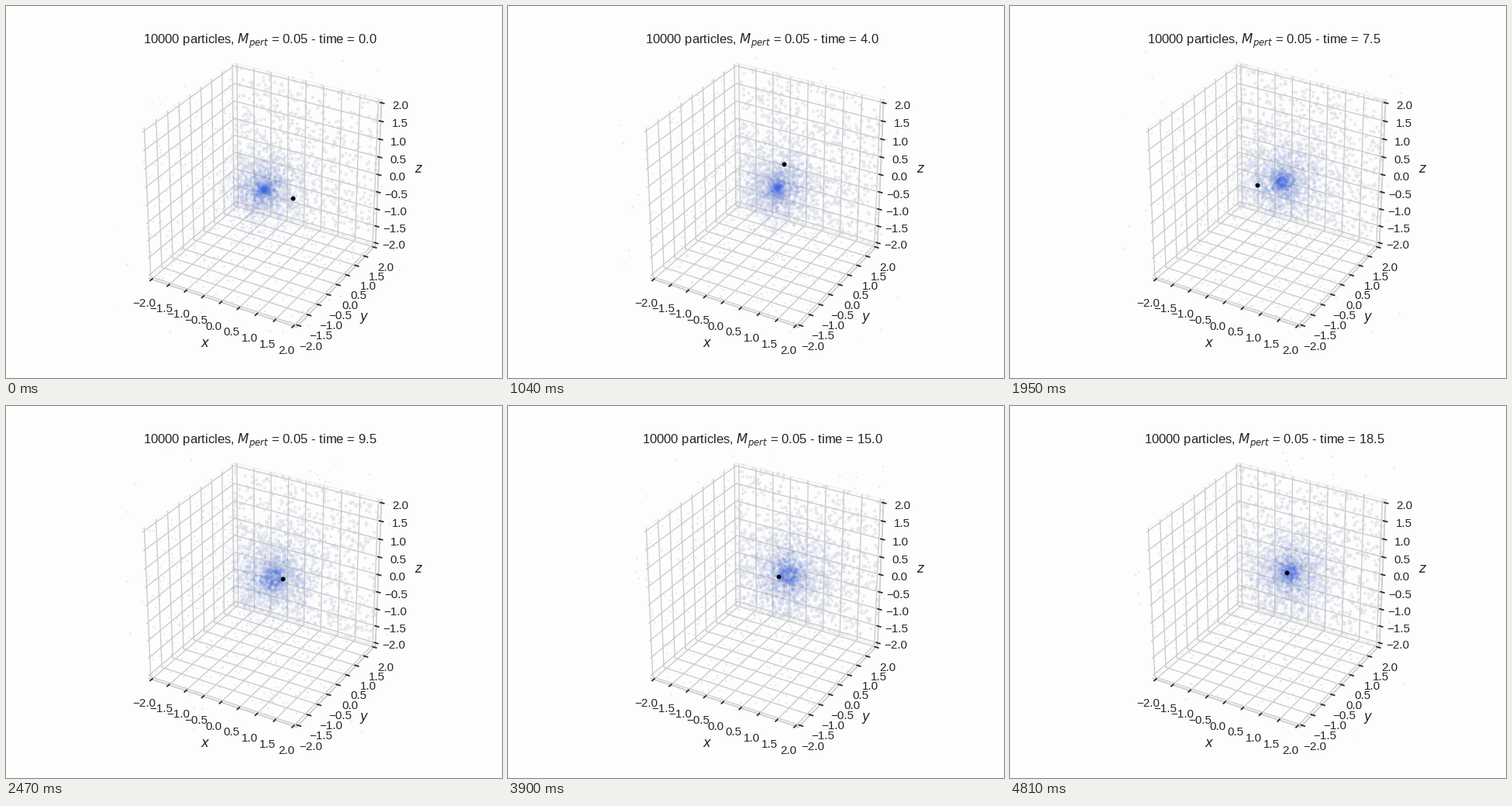
A matplotlib script for the animation above (4940 ms loop, 640 by 480 pixels).

```python
import numpy as np
import matplotlib.pyplot as plt
from matplotlib.animation import FuncAnimation
from matplotlib.path import Path
from mpl_toolkits.mplot3d import proj3d

FRAMES, INTERVAL, STEP = 38, 130, 0.5
BACKGROUND = "#fdfdfd"

plt.rcParams.update({
    "font.family": "Liberation Sans",
    "text.color": ".15", "axes.labelcolor": ".15",
    "xtick.color": ".15", "ytick.color": ".15",
    "axes.edgecolor": ".8", "axes.linewidth": 1.25,
    "grid.color": ".8", "grid.linewidth": 1,
    "xtick.major.width": 1.25, "ytick.major.width": 1.25,
    "axes.titlesize": 12, "axes.labelsize": 12,
    "xtick.labelsize": 11, "ytick.labelsize": 11,
    "figure.facecolor": BACKGROUND, "savefig.facecolor": BACKGROUND,
})

# Motion of the cluster centre and the perturber's decaying orbit around it
KEYS = np.array([0, 4, 6, 9.5, 12.5, 15, 18.5])
CENTRE_X = [0, 0.20, 0.22, -0.08, -0.02, 0.11, 0.05]
CENTRE_Y = [0, 0.22, 0.41, 0.63, 0.75, 0.91, 1.01]
ORBIT_R = [0.8, 1.22, 0.96, 0.21, 0.12, 0.26, 0.08]
ORBIT_ANGLE = np.radians([0, 112, 145, 379, 669, 947, 1291])


def track(t, values):
    """Smooth cubic interpolation through the key times."""
    slopes = np.gradient(values, KEYS)
    i = min(np.searchsorted(KEYS, t, side="right") - 1, len(KEYS) - 2)
    h = KEYS[i + 1] - KEYS[i]
    s = (t - KEYS[i]) / h
    return ((1 + 2 * s) * (1 - s) ** 2 * values[i]
            + s * (1 - s) ** 2 * h * slopes[i]
            + s * s * (3 - 2 * s) * values[i + 1]
            + s * s * (s - 1) * h * slopes[i + 1])


def centre(t):
    return np.array([track(t, CENTRE_X), track(t, CENTRE_Y), 0])


def perturber(t):
    r, a = track(t, ORBIT_R), track(t, ORBIT_ANGLE)
    return centre(t) + r * np.array([np.cos(a), np.sin(a), 0])


class Stars:
    """Stars on randomly tilted circular orbits, uniform in radius."""

    def __init__(self, n, r_max, rng):
        self.r = r_max * rng.random(n)
        a, b = rng.normal(size=(2, n, 3))
        a /= np.linalg.norm(a, axis=1, keepdims=True)
        b -= a * np.sum(a * b, axis=1, keepdims=True)
        b /= np.linalg.norm(b, axis=1, keepdims=True)
        self.a, self.b = a, b
        self.rate = 0.5 / np.maximum(self.r, 0.1)
        self.rank = rng.random(n)

    def at(self, t, spread=1, soft=0):
        r = np.hypot(self.r * spread, soft)[:, None]
        phase = (self.rate * t)[:, None]
        return centre(t) + r * (self.a * np.cos(phase) + self.b * np.sin(phase))


rng = np.random.default_rng(7)
core = Stars(1500, 1.3, rng)
halo = Stars(3000, 5, rng)

fig = plt.figure(figsize=(6.4, 4.8), dpi=100)
ax = fig.add_subplot(projection="3d")
ax.set_box_aspect((1, 1, 1))
ax.patch.set_visible(False)
ticks = np.linspace(-2, 2, 9)
LIM = 2 * 25 / 24
ax.set(xlim=(-LIM, LIM), ylim=(-LIM, LIM), zlim=(-LIM, LIM),
       xticks=ticks, yticks=ticks, zticks=ticks,
       xlabel="$x$", ylabel="$y$", zlabel="$z$")
for axis in (ax.xaxis, ax.yaxis, ax.zaxis):
    axis.pane.set_fill(False)
view = ax.get_proj()


def project(p):
    x, y, _ = proj3d.proj_transform(*np.atleast_2d(p).T, view)
    return np.column_stack([x, y])


def wall(*corners):
    return Path(project(LIM * np.array(corners)))


back = wall((-1, 1, -1), (1, 1, -1), (1, 1, 1), (-1, 1, 1))
floor = wall((-1, -1, -1), (1, -1, -1), (1, 1, -1), (-1, 1, -1))
side = wall((-1, -1, -1), (-1, 1, -1), (-1, 1, 1), (-1, -1, 1))


def layer(zorder):
    """Flat axes covering the square drawing area of the 3D axes."""
    flat = fig.add_axes([143.2 / 640, 0.11, 369.6 / 640, 0.77], zorder=zorder)
    flat.axis("off")
    flat.set(xlim=(-0.095, 0.09), ylim=(-0.095, 0.09))
    return flat


under, over = layer(-1), layer(5)
start = np.zeros(len(halo.r))
halo_dots = under.scatter(start, start, color=(0.87, 0.878, 0.91, 0.65),
                          linewidths=0)
core_colors = np.full((len(core.r), 4), (65 / 255, 105 / 255, 225 / 255, 1))
core_colors[:, 3] = 0.085 * (1 - (core.r / 1.4) ** 2)
start = np.zeros(len(core.r))
core_dots = over.scatter(start, start, s=9, c=core_colors, linewidths=0)
mass_dot = over.scatter([0], [0], s=18, color="black", linewidths=0, zorder=3)
for flat in (under, over):
    flat.set(xlim=(-0.095, 0.09), ylim=(-0.095, 0.09))


def update(i):
    t = i * STEP
    points = project(halo.at(t))
    on_back = back.contains_points(points)
    shown = np.select(
        [on_back, floor.contains_points(points), side.contains_points(points)],
        [1, 0.6, 0.5], 0.06)
    sizes = np.where(on_back, 9, 3.5) * (halo.rank < shown)
    halo_dots.set_offsets(points)
    halo_dots.set_sizes(sizes)

    puff = np.interp(t, [0, 4, 6, 9.5, 18.5], [0, 0, 0.2, 1, 0.8])
    core_dots.set_offsets(project(core.at(t, 1 + 0.15 * puff, 0.17 * puff)))
    mass_dot.set_offsets(project(perturber(t)))
    ax.set_title("10000 particles, $M_{pert}$ = 0.05 - time = " f"{t:.1f}")
    return halo_dots, core_dots, mass_dot


anim = FuncAnimation(fig, update, frames=FRAMES, interval=INTERVAL,
                     repeat=True, repeat_delay=0, blit=False)
plt.show()
```
